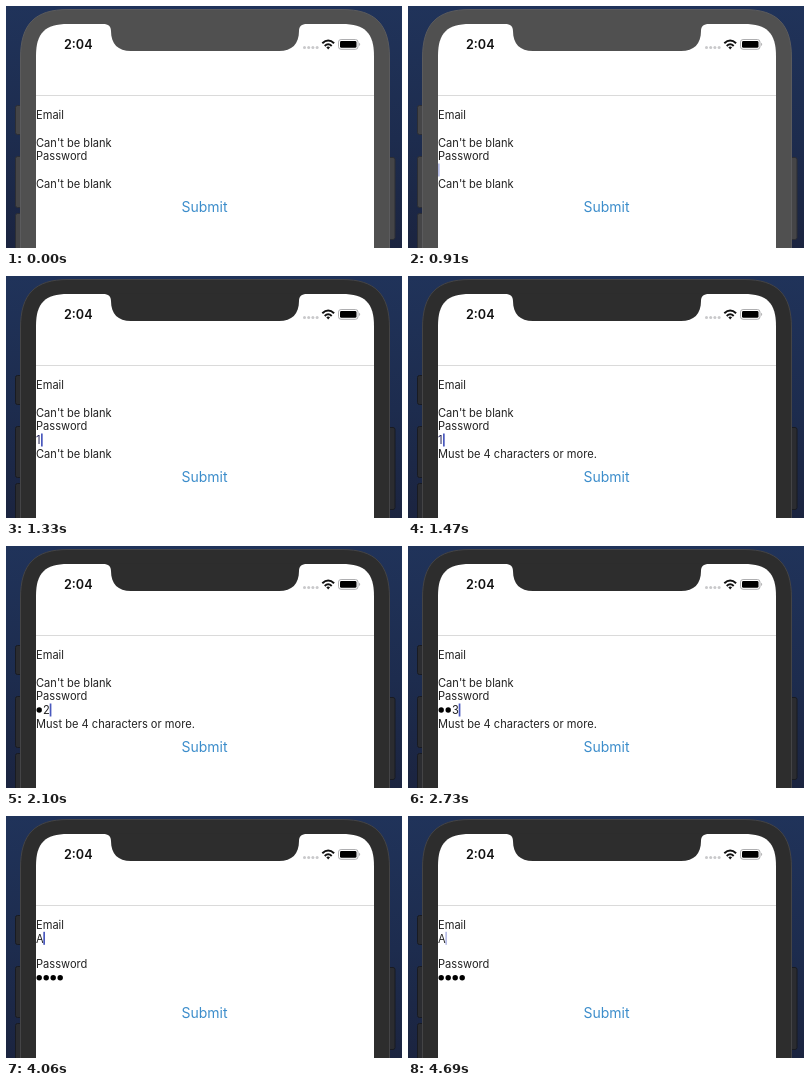
Animation, 396 px wide and 242 px high, one loop 4.76 s. Source, as an HTML page:

```html
<!DOCTYPE html>
<html lang="en">
<head>
<meta charset="utf-8">
<title>Form validation</title>
<style>
  html, body { margin: 0; width: 100%; height: 100%; overflow: hidden; background: #1d2b4c; }
  svg { display: block; width: 100vw; height: 100vh; }
  text { font: 11.1px Inter, "Open Sans", sans-serif; fill: #222; white-space: pre; }
  #clock { font-size: 12.6px; font-weight: 600; fill: #111; }
  #submit { font-size: 14px; fill: #3c8dcb; }
  #caret { fill: #4a59bd; }
  #phone { --body: #505050; --rim: #5b5b5d; --key: #454547; --edge: #2c2e34; }
  #phone.dark { --body: #2d2d2d; --rim: #444446; --key: #2b2c30; --edge: #191b21; }
  .body { fill: var(--body); stroke: var(--rim); }
  .notch { fill: var(--body); }
  .key { fill: var(--key); stroke: var(--edge); }
</style>
</head>
<body>
<svg viewBox="0 0 396 242" preserveAspectRatio="none">
  <defs>
    <linearGradient id="sky" x2="0" y2="1">
      <stop stop-color="#20335a"/>
      <stop offset=".55" stop-color="#1d2c4e"/>
      <stop offset="1" stop-color="#1b2440"/>
    </linearGradient>
  </defs>
  <rect width="396" height="242" fill="url(#sky)"/>
  <g id="phone">
    <g class="key">
      <rect x="9.5" y="99.5" width="8" height="29" rx="2"/>
      <rect x="9.5" y="150.5" width="8" height="51" rx="2"/>
      <rect x="9.5" y="207.5" width="8" height="51" rx="2"/>
      <rect x="380.5" y="151.5" width="8.500" height="82" rx="2"/>
    </g>
    <path class="body" d="M14.500 250V52C14.500 18 29 3.500 62 3.500H336C369 3.500 383.500 18 383.500 52V250Z"/>
    <path fill="#fff" d="M30 242V50C30 27 39 18 62 18H336C359 18 368 27 368 50V242Z"/>
    <path class="notch" d="M97 17.500H301V18C295.500 18 293 20.500 293 25C293 38 286 45 273 45H125C112 45 105 38 105 25C105 20.500 102.500 18 97 18Z"/>
  </g>

  <text id="clock" x="58" y="43">2:04</text>
  <g fill="#c9c9cb">
    <circle cx="298.500" cy="41.500" r="1.500"/><circle cx="302.700" cy="41.500" r="1.500"/>
    <circle cx="306.900" cy="41.500" r="1.500"/><circle cx="311.100" cy="41.500" r="1.500"/>
  </g>
  <g fill="none" stroke="#111" stroke-width="2">
    <path d="M316.300 37.300Q322.200 31.700 328.100 37.300"/>
    <path d="M318.700 39.900Q322.200 36.700 325.700 39.900"/>
  </g>
  <path d="M320.300 41.300Q322.200 39.900 324.100 41.300L322.200 43.400Z" fill="#111"/>
  <rect x="332.500" y="33.500" width="19.500" height="9.800" rx="2.600" fill="none" stroke="#a5a5a7" stroke-width=".9"/>
  <rect x="334" y="35" width="16.500" height="6.800" rx="1.400" fill="#000"/>
  <path d="M353.200 36.800Q355.200 38.400 353.200 40Z" fill="#a5a5a7"/>
  <path d="M30 89.500H368" stroke="#dadada"/>

  <text x="30" y="112.500">Email</text>
  <text id="mail" x="30" y="126.500"></text>
  <text id="mailError" x="30" y="140.500"></text>
  <text id="label" x="30">Password</text>
  <g id="dots"></g>
  <text id="pass"></text>
  <text id="passError" x="30" y="182"></text>
  <text id="submit" x="175.500">Submit</text>
  <rect id="caret" width="1.700" height="13"/>
</svg>
<script>
const LOOP = 4760;
const BLANK = "Can't be blank";
const SHORT = "Must be 4 characters or more.";

// Each step lists only what changes at that time.
const steps = [
  [0, { dark: false, mail: "", mailError: BLANK, masked: 0, last: "", passError: BLANK,
        ink: "#222", labelY: 154, submitY: 206, caretX: 30, caretY: 157.5, caret: 0 }],
  [350, { caret: .5 }],
  [420, { caret: 1 }],
  [840, { caret: .8 }],
  [910, { caret: .4 }],
  [980, { caret: 0, dark: true }],
  [1330, { last: "1", ink: "#26265a", caretX: 35, caret: 1 }],
  [1400, { passError: SHORT }],
  [1890, { caret: .8 }],
  [1960, { caret: .4 }],
  [2030, { caret: 0 }],
  [2100, { masked: 1, last: "2", ink: "#222", caretX: 43.7, caret: 1 }],
  [2730, { masked: 2, last: "3", caretX: 50.7 }],
  [3010, { masked: 3, last: "4", caretX: 58, passError: "", submitY: 204 }],
  [3640, { masked: 4, last: "", caretX: 30, caretY: 115.8 }],
  [4060, { mail: "A", mailError: "", caretX: 37.3, labelY: 151.8, submitY: 202 }],
  [4620, { caret: .8 }],
  [4690, { caret: .4 }]
];

const el = id => document.getElementById(id);
const set = (id, attrs) => {
  for (const k in attrs) el(id).setAttribute(k, attrs[k]);
};

const dots = Array.from({ length: 4 }, (_, i) => {
  const dot = document.createElementNS("http://www.w3.org/2000/svg", "circle");
  dot.setAttribute("cx", 33.2 + 7 * i);
  dot.setAttribute("r", 2.7);
  el("dots").append(dot);
  return dot;
});

function stateAt(time) {
  return Object.assign({}, ...steps.filter(([at]) => at <= time).map(([, change]) => change));
}

function draw(s) {
  el("phone").classList.toggle("dark", s.dark);
  for (const id of ["mail", "mailError", "passError"]) el(id).textContent = s[id];
  el("pass").textContent = s.last;
  el("pass").style.fill = s.ink;
  set("pass", { x: 30 + 7 * s.masked, y: s.labelY + 14 });
  set("label", { y: s.labelY });
  set("submit", { y: s.submitY });
  set("caret", { x: s.caretX, y: s.caretY, opacity: s.caret });
  dots.forEach((dot, i) => {
    dot.setAttribute("cy", s.labelY + 10);
    dot.setAttribute("opacity", i < s.masked ? 1 : 0);
  });
}

const start = performance.now();
function tick() {
  draw(stateAt((performance.now() - start) % LOOP));
  requestAnimationFrame(tick);
}
tick();
</script>
</body>
</html>
```
